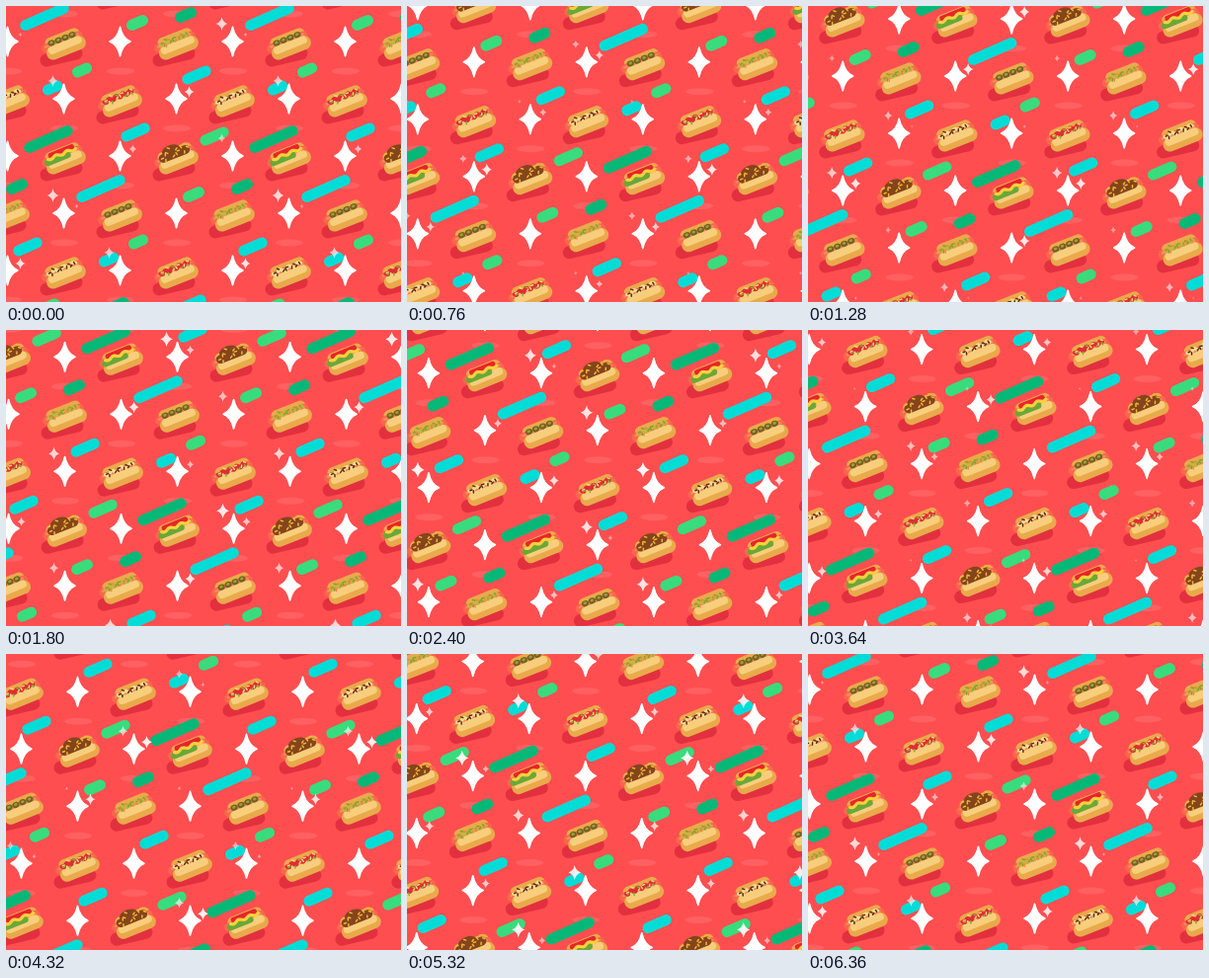
An HTML page with a canvas for the animation above (6400 ms loop, 400x300 px).

```html
<!DOCTYPE html>
<html>
<head>
<meta charset="utf-8">
<style>
html, body { margin: 0; width: 100%; height: 100%; overflow: hidden; background: #ff4e50; }
canvas { display: block; }
</style>
</head>
<body>
<canvas id="stage" width="400" height="300"></canvas>
<script>
const ctx = document.getElementById('stage').getContext('2d');
const LOOP = 6400, STEP = 40;
// The pattern repeats along (W, 0) and (SHIFT, H).
const W = 228, H = 174, SHIFT = 57, ROW = H / 3;
const SLOPE = -0.413;
const BUN = '#e9aa4b', BUN_LIGHT = '#f8ce7c';

// Centre and length of the dashes in one cell, by colour
const pills = {
  '#02dcd6': [[39, 11, 53], [193, 70, 31], [47, 83, 21], [131, 128, 31]],
  '#06b877': [[182, 9, 23], [43, 135, 53]],
  '#38dc7c': [[133, 17, 23], [77, 65, 21], [211, 132, 31]]
};

function line(x1, y1, x2, y2, width, color) {
  ctx.lineCap = 'round';
  ctx.lineWidth = width;
  ctx.strokeStyle = color;
  ctx.beginPath();
  ctx.moveTo(x1, y1);
  ctx.lineTo(x2, y2);
  ctx.stroke();
}

function oval(x, y, rx, ry, color) {
  ctx.fillStyle = color;
  ctx.beginPath();
  ctx.ellipse(x, y, rx, ry, 0, 0, 7);
  ctx.fill();
}

function pill(x, y, length, color) {
  const half = (length - 11) / 2;
  const dx = half * Math.cos(SLOPE), dy = half * Math.sin(SLOPE);
  line(x - dx, y - dy, x + dx, y + dy, 11, color);
}

function wave(y, height, width, color, waves) {
  ctx.lineCap = ctx.lineJoin = 'round';
  ctx.lineWidth = width;
  ctx.strokeStyle = color;
  ctx.beginPath();
  for (let x = -14; x <= 16; x++)
    ctx.lineTo(x, y + height * Math.sin((x + 14) / 30 * waves * Math.PI * 2));
  ctx.stroke();
}

function bits(n, y, spread, color, width = 1.5) {
  for (let i = 0; i < n; i++) {
    const x = -13 + 28 * i / (n - 1), dy = y + spread * Math.sin(i * 2.4);
    const a = i * 1.9;
    line(x, dy, x + 2.2 * Math.cos(a), dy + 2.2 * Math.sin(a), width, color);
  }
}

function star(x, y, rx, ry, alpha = 1) {
  const k = 0.22;
  ctx.save();
  ctx.translate(x, y);
  ctx.globalAlpha = alpha;
  ctx.fillStyle = ctx.strokeStyle = '#fff';
  ctx.lineJoin = 'round';
  ctx.lineWidth = 1.6;
  ctx.beginPath();
  ctx.moveTo(0, -ry);
  ctx.quadraticCurveTo(k * rx, -k * ry, rx, 0);
  ctx.quadraticCurveTo(k * rx, k * ry, 0, ry);
  ctx.quadraticCurveTo(-k * rx, k * ry, -rx, 0);
  ctx.quadraticCurveTo(-k * rx, -k * ry, 0, -ry);
  ctx.fill();
  if (alpha === 1) ctx.stroke();
  ctx.restore();
}

// Toppings in the order of the hot dogs, row by row
const toppings = [
  function pepper() {
    for (let i = 0; i < 4; i++) {
      oval(-10 + 7.5 * i, -4.5, 3.6, 3, '#6b6420');
      oval(-10 + 7.5 * i, -5, 1.8, 1.4, '#a59a3a');
    }
  },
  function relish() {
    wave(-4, 1, 4, '#c9b440', 4);
    bits(10, -4.5, 2, '#79a332');
    bits(7, -3.5, 2, '#ee8a48');
  },
  function drizzle() {
    wave(-4, 1.5, 3.5, '#f6dd8c', 3);
    bits(10, -4, 2, '#5a2a18');
  },
  function ketchup() {
    wave(-4, 1.5, 4, '#e02c36', 4);
    bits(8, -4.5, 2.5, '#f8d66a');
    bits(5, -3, 2, '#7fae3c');
  },
  function salad() {
    line(-15, -1, 6, -1, 7, '#6aa838');
    line(-10, -7, 13, -7, 5, '#e8242c');
    wave(-4, 1.2, 3.2, '#ffd03c', 2.5);
  },
  function chili() {
    line(-11, -4, 13, -4, 9, '#84451c');
    oval(-1, -8, 10, 6, '#84451c');
    bits(8, -4, 3, '#f2b632');
    bits(6, -9, 2, '#f2b632');
  }
];

function hotDog(x, y, topping) {
  ctx.save();
  ctx.translate(x, y);
  line(-16, 17, 14, 10, 13, '#e2303f');
  ctx.rotate(-0.38);
  line(-11, -5, 15, -5, 11, BUN);
  line(-17, -1.5, 18, -1.5, 9, '#f5694a');
  line(-17, -3, 18, -3, 2.5, '#ff8660');
  line(-12, 5.5, 16, 5.5, 14, BUN);
  line(-12, 2.5, 16, 2.5, 8, BUN_LIGHT);
  topping();
  ctx.restore();
}

// Calls draw for each place of the three staggered rows of two.
function eachPlace(draw) {
  for (let r = 0; r < 3; r++)
    for (let c = 0; c < 2; c++) draw(r, c, W / 2 * c, ROW * r, r % 2 * SHIFT);
}

function spark(x, y, t, peak, size) {
  const gap = Math.abs(t - peak % LOOP);
  const s = 1 - Math.min(gap, LOOP - gap) / 1700;
  if (s > 0) star(x, y, size * 0.85 * Math.sqrt(s), size * Math.sqrt(s), 0.35 + 0.6 * s);
}

function cell(t) {
  eachPlace((r, c, x, y, shift) => oval(x + shift + 2, y + 66, 14, 3.5, '#ff6062'));
  for (const color in pills)
    for (const [x, y, length] of pills[color]) pill(x, y, length, color);
  eachPlace((r, c, x, y, shift) => hotDog(x - shift + 57, y + 38, toppings[r * 2 + c]));
  eachPlace((r, c, x, y, shift) => {
    const sx = x + shift + 1.5, sy = y + 36;
    star(sx, sy, 10.5, 14.8);
    // Each star has two twinkles, half a loop apart between the columns.
    spark(sx - 11, sy - 18, t, 9100 - 350 * r - 3200 * (1 - c), 8);
    spark(sx + 13, sy - 7, t, 1500 + 1350 * r + 3200 * c, 6.5);
  });
}

function frame(now) {
  const t = Math.floor(now % LOOP / STEP) * STEP, p = t / (LOOP - STEP);
  ctx.fillStyle = '#ff4e50';
  ctx.fillRect(0, 0, 400, 300);
  for (let j = -2; j <= 1; j++) {
    for (let i = -2; i <= 4; i++) {
      const x = W * i + SHIFT * j + (SHIFT - 2 * W) * p, y = H * (j + p);
      if (x < -W - 40 || x > 460 || y < -H - 40 || y > 320) continue;
      ctx.save();
      ctx.translate(x, y);
      cell(t);
      ctx.restore();
    }
  }
  requestAnimationFrame(frame);
}
requestAnimationFrame(frame);
</script>
</body>
</html>
```
